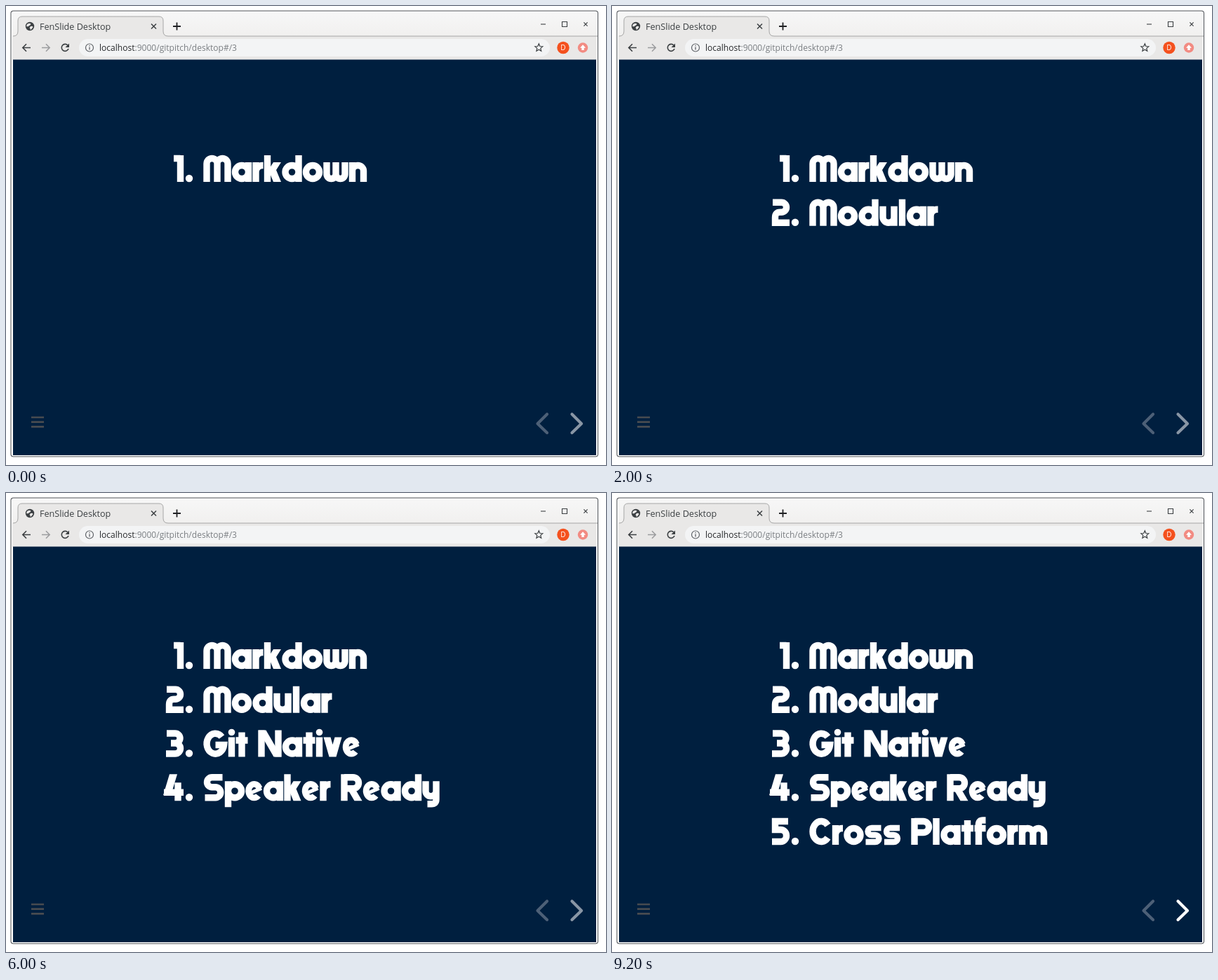
Recreate the animation shown at these times as an HTML page with a canvas. Size 855x655 px, loop 10000 ms.

```html
<!DOCTYPE html>
<html lang="en">
<head>
<meta charset="utf-8">
<title>Slide list</title>
<style>
html, body { margin: 0; width: 100%; height: 100%; overflow: hidden; background: #fff; }
canvas { display: block; width: 855px; height: 655px; }
</style>
</head>
<body>
<canvas id="stage" role="img"></canvas>
<script>
const STEP = 2000, LOOP = 10000;
const ITEMS = ['Markdown', 'Modular', 'Git Native', 'Speaker Ready', 'Cross Platform'];
const UI_FONT = '"Open Sans", "Noto Sans", sans-serif';
const NAVY = '#001f3f', INK = '#3c4043';
const CAP = 38, MID = 28, PEN = 9, GAP = 1.5, SPACE = 15;

const canvas = document.getElementById('stage');
const ctx = canvas.getContext('2d');
const ratio = window.devicePixelRatio || 1;
canvas.width = 855 * ratio;
canvas.height = 655 * ratio;
ctx.scale(ratio, ratio);

// Parts of the display lettering, drawn up from the baseline
const stem = (x, top, foot = 0) => `M${x} ${-top}V${-foot}`;
const arch = (x, w, top) =>
  `M${x} 0V${PEN / 2 + w / 2 - top}a${w / 2} ${w / 2} 0 0 1 ${w} 0V0`;
const cup = (x, w, foot = 0) =>
  `M${x} ${-MID}V${-PEN / 2 - w / 2 - foot}a${w / 2} ${w / 2} 0 0 0 ${w} 0V${-MID}`;
const slash = (x1, y1, x2, y2, d) => `M${x1} ${-y1}h${d}L${x2 + d} ${-y2}h${-d}z`;
const dot = (y, r) => `M${4.5 - r} ${-y}a${r} ${r} 0 1 1 ${2 * r} 0a${r} ${r} 0 1 1 ${-2 * r} 0z`;
const bowl = 'M4.5 -14a9.5 9.5 0 1 1 19 0a9.5 9.5 0 1 1 -19 0z';
const loop = stem(4.5, CAP) + 'M4.5 -33.5H17a8 8 0 0 1 0 16H4.5';

const glyph = (width, line, fill = '', pen = PEN + 0.4) =>
  ({ width, line: new Path2D(line), fill: new Path2D(fill), pen });

const GLYPHS = {
  M: glyph(39, arch(4.5, 15, CAP) + arch(19.5, 15, CAP)),
  m: glyph(40, stem(4.5, MID) + arch(4.5, 15.5, MID) + arch(20, 15.5, MID)),
  n: glyph(25, stem(4.5, MID) + arch(4.5, 16, MID)),
  u: glyph(26, cup(5, 16) + stem(21, MID)),
  w: glyph(35, cup(4.5, 13) + cup(17.5, 13)),
  y: glyph(24, cup(4.5, 15, 2) + 'M19.5 -28V-2Q19.5 4.5 13 4.5H7'),
  o: glyph(28, bowl),
  a: glyph(28, bowl + stem(23.5, MID)),
  d: glyph(28, bowl + stem(23.5, CAP)),
  p: glyph(28, bowl + stem(4.5, MID, -9)),
  e: glyph(24, 'M18 -7.4A8 9.8 0 1 1 19.5 -18', 'M6 -8L23.5 -15.5L21.5 -20.5L5 -13z', 8.8),
  l: glyph(10, stem(5, CAP)),
  i: glyph(9, stem(4.5, MID), dot(35, 4.8)),
  r: glyph(15, stem(4.5, MID) + 'M4.5 0V-14a9.5 9.5 0 0 1 9.5 -9.5H15'),
  t: glyph(17, stem(8.5, 35) + 'M0 -23.5H17'),
  f: glyph(16, 'M6 0V-29Q6 -35 12 -35H16M0 -23.5H16'),
  k: glyph(24, stem(4.5, CAP), slash(13, MID, 3.5, 13, 11) + slash(6, 17, 13, 0, 11)),
  v: glyph(26, '', slash(0, MID, 8, 0, 10) + slash(16, MID, 8, 0, 10)),
  s: glyph(25, 'M23.5 -24H10a5.5 5 0 0 0 0 10h5a5.5 5 0 0 1 0 10H1.5', '', 8.4),
  N: glyph(33, stem(4.5, CAP) + stem(28.5, CAP), slash(0, CAP, 22, 0, 11)),
  G: glyph(34, 'M26 -28.5A12.3 14.5 0 1 0 29.1 -17H17'),
  C: glyph(31, 'M26 -27.9A12 14.5 0 1 0 26 -10.1'),
  S: glyph(29, 'M27 -33.5H12a7 7 0 0 0 0 14h5a7.25 7.5 0 0 1 0 15H2'),
  P: glyph(29, loop),
  R: glyph(30, loop, slash(9, 17, 19, 0, 11)),
  1: glyph(14, stem(9.5, CAP) + 'M0 -33.5H9.5'),
  2: glyph(25, 'M1 -33.5H13.5a7 7 0 0 1 0 14H11.5Q4.5 -19.5 4.5 -12V-4.5H25'),
  3: glyph(25, 'M1 -33.5H13a7 7 0 0 1 0 14H7M13 -19.5a7.5 7.5 0 0 1 0 15H0'),
  4: glyph(29, stem(21, 26) + 'M1 -12H29', slash(9, CAP, 0, 8, 11)),
  5: glyph(26, 'M24 -33.5H5.5V-21.5H13.5a8 8.5 0 0 1 0 17H1'),
  '.': glyph(10, '', dot(5, 5.2))
};

function letter(g, x, y) {
  ctx.save();
  ctx.translate(x, y);
  ctx.lineWidth = g.pen;
  ctx.stroke(g.line);
  ctx.fill(g.fill);
  ctx.restore();
}

function heading(text, x, y) {
  for (const c of text) {
    if (c === ' ') { x += SPACE - GAP; continue; }
    letter(GLYPHS[c], x, y);
    x += GLYPHS[c].width + GAP;
  }
}

function line(path, color, width, cap = 'butt') {
  ctx.strokeStyle = color;
  ctx.lineWidth = width;
  ctx.lineCap = cap;
  ctx.stroke(new Path2D(path));
}

function shape(path, color) {
  ctx.fillStyle = color;
  ctx.fill(new Path2D(path));
}

function disc(x, y, r, color) {
  ctx.fillStyle = color;
  ctx.beginPath();
  ctx.arc(x, y, r, 0, Math.PI * 2);
  ctx.fill();
}

function pill(x, y, w, h, r, color) {
  ctx.fillStyle = color;
  ctx.beginPath();
  ctx.roundRect(x, y, w, h, r);
  ctx.fill();
}

function label(text, x, y, size, color) {
  ctx.font = `${size}px ${UI_FONT}`;
  ctx.fillStyle = color;
  ctx.fillText(text, x, y);
  return x + ctx.measureText(text).width;
}

const cross = (x, y, r) =>
  `M${x - r} ${y - r}L${x + r} ${y + r}M${x + r} ${y - r}L${x - r} ${y + r}`;

function star(x, y, r) {
  ctx.beginPath();
  for (let i = 0; i < 10; i++) {
    const a = i * Math.PI / 5 - Math.PI / 2, d = i % 2 ? r * 0.45 : r;
    ctx.lineTo(x + d * Math.cos(a), y + d * Math.sin(a));
  }
  ctx.closePath();
  ctx.strokeStyle = INK;
  ctx.lineWidth = 1.2;
  ctx.stroke();
}

function tabStrip() {
  const tab = 'M10 43Q17 43 17 36V21Q17 15 23 15H218Q224 15 224 21V36Q224 43 231 43';
  shape(tab + 'z', '#e9e8e7');
  line(tab + 'H843', '#a6a6a6', 1);

  disc(34, 29, 6.2, INK);
  shape('M30 26Q33 24 35 25Q36 27 33 28Q32 30 29 29zM35 29Q38 28 38.5 30Q37 33 34.5 34Q35 32 33.5 31z', '#e9e8e7');
  label('FenSlide Desktop', 48, 33.5, 12.6, INK);
  line(cross(210.5, 29, 3.5), INK, 1.5);
  line('M238 29H249M243.5 23.5V34.5', '#202124', 1.8);

  line('M762 26H769', INK, 1.1);
  line('M792.5 22.5H799.5V29.5H792.5Z', INK, 1.1);
  line(cross(826, 26, 2.6), INK, 1.2);
}

function toolbar() {
  line('M35 59.5H24M29 54.2L23.8 59.5L29 64.8', INK, 1.6);
  line('M51 59.5H62M57 54.2L62.2 59.5L57 64.8', '#9b9c9e', 1.5);
  line('M88 56A5 5 0 1 0 89 61', INK, 1.6);
  shape('M90 53.5V59H84.5z', INK);

  pill(104, 47, 671, 25, 12.5, '#f3f4f5');
  line('M124.5 59.5a5.5 5.5 0 1 1 -11 0a5.5 5.5 0 1 1 11 0', '#5f6368', 1.2);
  line('M119 58.5V62.5M119 56V57.3', '#5f6368', 1.3);
  const end = label('localhost', 133, 63.7, 12.05, '#27292c');
  label(':9000/gitpitch/desktop#/3', end, 63.7, 12.05, '#7b7f83');
  star(759.3, 59.6, 5.8);

  disc(794, 59.5, 8.7, '#f4511e');
  ctx.textAlign = 'center';
  label('D', 794, 63, 10, '#fff');
  ctx.textAlign = 'left';
  disc(822, 59.5, 7.2, '#f28b82');
  shape('M822 55.3L826 59.7H823.7V63H820.3V59.7H818z', '#fff');
}

function browser() {
  ctx.fillStyle = '#fff';
  ctx.fillRect(0, 0, 855, 655);
  pill(6.5, 6.5, 837.5, 637, 4, '#4a4e53');
  pill(7.5, 7.5, 835.5, 635, 3, '#fff');

  const strip = ctx.createLinearGradient(0, 8, 0, 43);
  strip.addColorStop(0, '#f7f7f7');
  strip.addColorStop(1, '#f1f0ef');
  ctx.fillStyle = strip;
  ctx.fillRect(9, 9, 833, 34);
  ctx.fillStyle = '#e9e8e7';
  ctx.fillRect(9, 43, 833, 34);

  tabStrip();
  toolbar();
}

function controls(last) {
  line('M36 587H54M36 593.7H54M36 600.4H54', '#484b50', 2.7);
  ctx.lineJoin = 'round';
  line('M771 582.5L757.5 596L771 609', '#4d6077', 4.2, 'round');
  line('M806.5 582.5L820 596L806.5 609', last ? '#ffffff' : '#8996a5', 4.2, 'round');
  ctx.lineJoin = 'miter';
}

function draw(time) {
  const step = Math.floor(time % LOOP / STEP);
  browser();
  ctx.fillStyle = NAVY;
  ctx.fillRect(10, 76.5, 831, 564.5);

  ctx.fillStyle = ctx.strokeStyle = '#fff';
  ctx.lineCap = 'butt';
  ITEMS.slice(0, step + 1).forEach((text, i) => {
    const y = 251 + i * 62.75, digit = GLYPHS[i + 1];
    letter(digit, 253 - digit.width, y);
    letter(GLYPHS['.'], 256.5, y);
    heading(text, 281.5, y);
  });
  controls(step === ITEMS.length - 1);
}

canvas.setAttribute('aria-label', ITEMS.map((text, i) => `${i + 1}. ${text}`).join(', '));

function tick() {
  draw(performance.now());
  requestAnimationFrame(tick);
}
tick();
</script>
</body>
</html>
```
